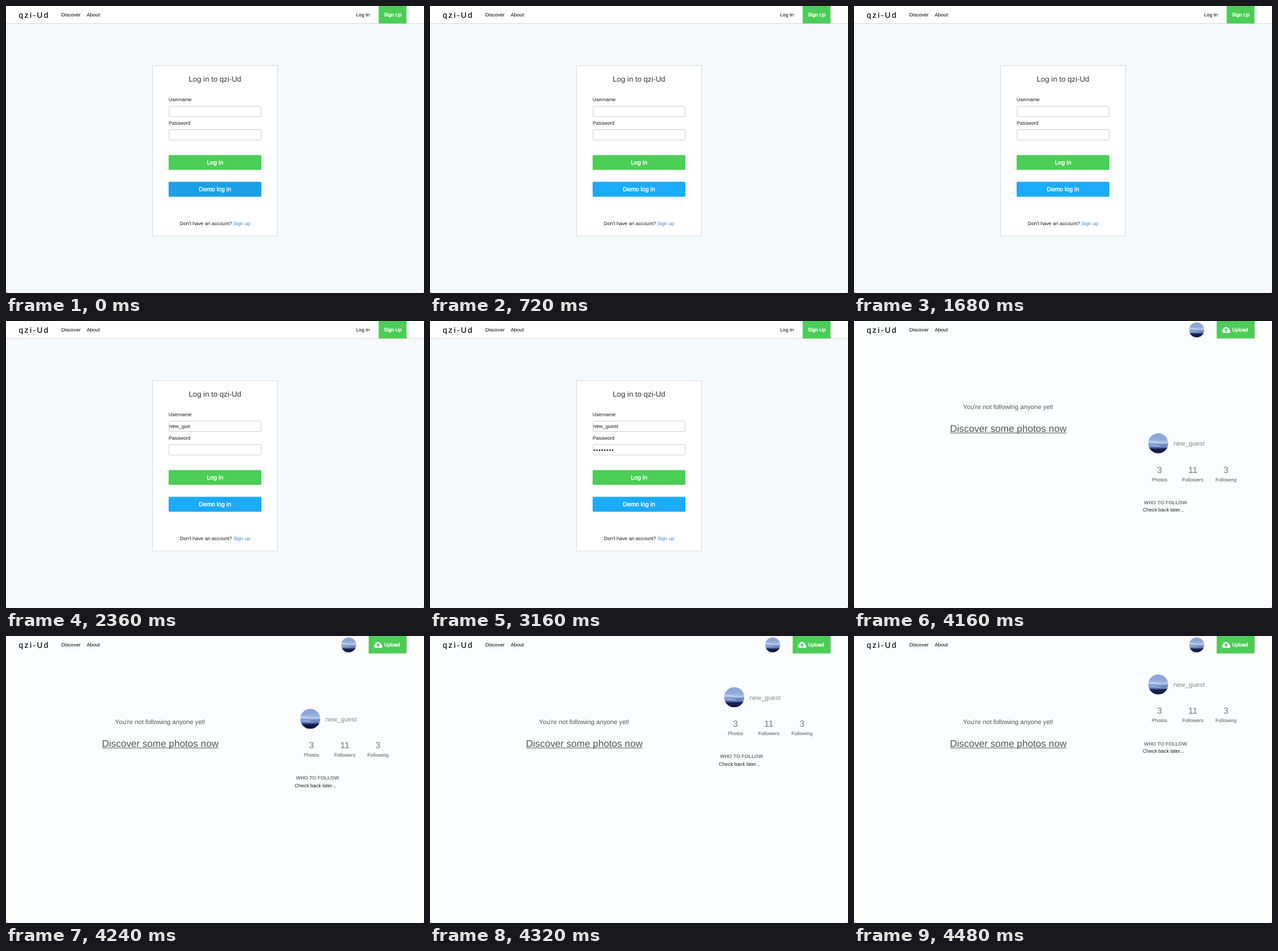
Write an HTML page that moves like this. It is 640 by 440 pixels and loops after 4520 ms.

```html
<!DOCTYPE html>
<html lang="en">
<head>
<meta charset="utf-8">
<title>Demo log in</title>
<style>
  html, body { margin: 0; width: 100%; height: 100%; overflow: hidden; background: #fcfdfe; }
  svg { display: block; width: 640px; height: 440px; }
  text {
    font: 7.65px "Liberation Sans", Arial, sans-serif;
    fill: #1c1c1c;
    text-rendering: geometricPrecision;
    white-space: pre;
  }
  .mid { text-anchor: middle; }
  .brand { font-size: 12px; letter-spacing: 2.1px; fill: #000; stroke: #000; stroke-width: .15px; }
  .nav { font-size: 7.55px; fill: #000; }
  .title { font-size: 11.5px; fill: #333; }
  .typed { font-size: 7.9px; }
  .light { fill: #fff; stroke: #fff; stroke-width: .35px; }
  .big { font-size: 9.25px; }
  .link { fill: #3b8bd0; }
  .soft { fill: #555; }
  .note { font-size: 9.86px; }
  .discover { font-size: 14.87px; }
  .user { font-size: 9.9px; fill: #888; }
  .count { font-size: 13.5px; fill: #777; }
  .head { font-size: 7.57px; font-weight: bold; fill: #777; }
  .field { fill: #fff; stroke: #d3d5d7; }
</style>
</head>
<body>
<svg viewBox="0 0 640 440">
  <defs>
    <linearGradient id="sky" x2="0" y2="1">
      <stop offset="0" stop-color="#8aa6d6"/>
      <stop offset=".3" stop-color="#8faadb"/>
      <stop offset=".45" stop-color="#a9c0e6"/>
      <stop offset=".58" stop-color="#6d8cc4"/>
      <stop offset=".7" stop-color="#5a78b4"/>
      <stop offset=".78" stop-color="#1f2f66"/>
      <stop offset="1" stop-color="#0b1236"/>
    </linearGradient>
    <clipPath id="round"><circle r="15.4"/></clipPath>
    <g id="avatar" clip-path="url(#round)">
      <circle r="15.4" fill="url(#sky)"/>
      <path d="M-16 -3Q-8 -5 0 -2T16 -4V-1Q6 1 -2 0T-16 -1Z" fill="#d3dff0" opacity=".55"/>
      <path d="M-16 3Q-6 1 2 4T16 3V5Q4 6 -4 5T-16 5Z" fill="#c3d3ee" opacity=".5"/>
      <path d="M-16 7Q-6 9 2 8.5T16 6V16H-16Z" fill="#101a45" opacity=".75"/>
    </g>
  </defs>

  <g id="login">
    <rect width="640" height="440" fill="#f5f9fb"/>
    <rect width="640" height="26.5" fill="#fff"/>
    <rect y="26.4" width="640" height="1" fill="#d6d9da"/>
    <text class="nav" x="536" y="16">Log In</text>
    <rect x="570.6" width="42.6" height="26.8" fill="#4ccd56"/>
    <text class="nav light mid" x="592.2" y="16.2">Sign Up</text>

    <rect x="224.5" y="91.5" width="191" height="261" fill="#fff" stroke="#dcdfe1"/>
    <text class="title mid" x="320" y="115.6">Log in to qzi-Ud</text>
    <text x="249" y="145.8">Username</text>
    <rect class="field" x="249.5" y="153.5" width="141" height="16" rx="1"/>
    <text class="typed" id="name" x="250" y="164.4"></text>
    <text x="249" y="181.8">Password</text>
    <rect class="field" x="249.5" y="189.5" width="141" height="16" rx="1"/>
    <g id="dots" fill="#222"></g>
    <rect x="249" y="228.4" width="142" height="22.8" rx="1.5" fill="#4ccd56"/>
    <text class="light big mid" x="320" y="243.1">Log in</text>
    <rect id="demo" x="249" y="269.6" width="142" height="23" rx="1.5"/>
    <text class="light big mid" x="320" y="284.2">Demo log in</text>
    <text x="266" y="335.7">Don't have an account?</text>
    <text class="link" x="348" y="335.7">Sign up</text>
  </g>

  <g id="home">
    <rect width="640" height="440" fill="#fcfdfe"/>
    <use href="#avatar" transform="translate(524.7 13.5) scale(.75)"/>
    <rect x="555" width="58.8" height="27.4" fill="#c4d8c6"/>
    <rect x="555.6" width="57.4" height="26.4" fill="#4ccd56"/>
    <path d="M566 18.2a3.1 3.1 0 0 1-.6-6a3.9 3.9 0 0 1 7.2-1.5a2.6 2.6 0 0 1 2.2 2.5a2.6 2.6 0 0 1-.5 5Z" fill="#fff"/>
    <path d="M569.6 10.9l3 3.2h-1.9v2.6h-2.2v-2.6h-1.9z" fill="#4ccd56"/>
    <text class="light" x="579" y="16.2">Upload</text>

    <text class="soft note mid" x="236.2" y="135.4">You're not following anyone yet!</text>
    <text class="soft discover mid" x="236.2" y="169.6">Discover some photos now</text>
    <rect x="146.8" y="171.2" width="178.6" height="1" fill="#666"/>

    <g id="side">
      <use href="#avatar" x="465.8"/>
      <text class="user" x="489" y="3.8">new_guest</text>
      <g id="stats"></g>
      <text class="head" x="444" y="93.5">WHO TO FOLLOW</text>
      <text x="442.3" y="104.9" fill="#111">Check back later...</text>
    </g>
  </g>

  <text class="brand" x="19.6" y="18">qzi-Ud</text>
  <text class="nav" x="84.8" y="16">Discover</text>
  <text class="nav" x="123.8" y="16">About</text>
  <path d="M0 438.4V440H1.6ZM640 438.4V440H638.4Z" fill="#999"/>
</svg>
<script>
const LOOP = 4520, TICK = 40;
const HOVER = 320, HOVER_MS = 200;
const TYPE = 1780, KEY_MS = 75;
const ENTER = 4080, SLIDE = 4090, SLIDE_MS = 400;
const SIDE_FROM = 223, SIDE_TO = 74;
const USER = 'new_guest', SECRET = 8;

const $ = id => document.getElementById(id);
const clamp = (v, lo, hi) => Math.min(hi, Math.max(lo, v));
const mix = (a, b, p) => a + (b - a) * p;

function add(parent, tag, attrs, label = '') {
  const el = document.createElementNS('http://www.w3.org/2000/svg', tag);
  for (const key in attrs) el.setAttribute(key, attrs[key]);
  el.textContent = label;
  return parent.appendChild(el);
}

const dots = Array.from({ length: SECRET }, (_, i) =>
  add($('dots'), 'circle', { cx: 251.6 + i * 4, cy: 198, r: 1.2 }));

[[467.8, '3', 'Photos'], [518.8, '11', 'Followers'], [569.5, '3', 'Following']]
  .forEach(([x, count, label]) => {
    add($('stats'), 'text', { class: 'count mid', x, y: 45.2 }, count);
    add($('stats'), 'text', { class: 'soft mid', x, y: 58.3 }, label);
  });

// CSS "ease": cubic-bezier(.25, .1, .25, 1)
function ease(p) {
  const curve = (a, b, u) => 3 * a * u * (1 - u) ** 2 + 3 * b * u * u * (1 - u) + u ** 3;
  let lo = 0, hi = 1;
  for (let i = 0; i < 24; i++) {
    const u = (lo + hi) / 2;
    if (curve(.25, .25, u) < p) lo = u; else hi = u;
  }
  return curve(.1, 1, lo);
}

function draw(t) {
  const hover = clamp((t - HOVER) / HOVER_MS, 0, 1);
  const blue = [[27, 28], [160, 171], [231, 248]].map(([a, b]) => Math.round(mix(a, b, hover)));
  $('demo').setAttribute('fill', `rgb(${blue})`);

  const keys = Math.max(0, Math.floor((t - TYPE) / KEY_MS));
  $('name').textContent = USER.slice(0, keys);
  dots.forEach((dot, i) => dot.setAttribute('visibility', keys > USER.length + i ? 'inherit' : 'hidden'));

  const inside = t >= ENTER;
  $('login').setAttribute('visibility', inside ? 'hidden' : 'visible');
  $('home').setAttribute('visibility', inside ? 'visible' : 'hidden');
  const y = mix(SIDE_FROM, SIDE_TO, ease(clamp((t - SLIDE) / SLIDE_MS, 0, 1)));
  $('side').setAttribute('transform', `translate(0 ${y.toFixed(2)})`);
}

const start = performance.now();
function frame() {
  const t = (performance.now() - start) % LOOP;
  draw(Math.floor(t / TICK) * TICK);
  requestAnimationFrame(frame);
}
frame();
</script>
</body>
</html>
```
